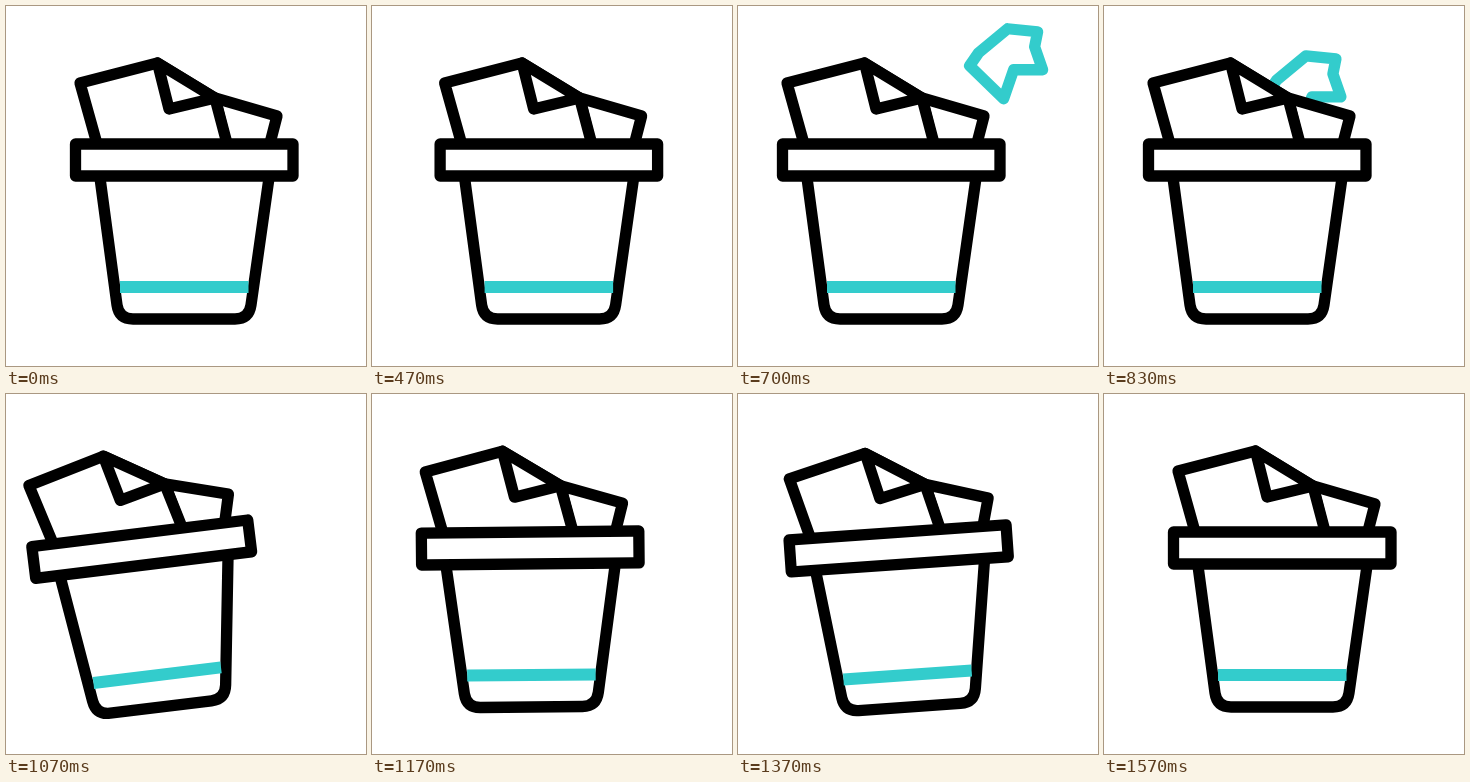
Write an HTML page that moves like this. It is 360 px wide and 360 px high and loops after 2.5 s.

```html
<!DOCTYPE html>
<html lang="en">
<head>
<meta charset="utf-8">
<title>Paper bin</title>
<style>
  html, body { margin: 0; height: 100%; overflow: hidden; background: #fff; }
  svg { display: block; width: 100%; height: 100%; }
  path { stroke-width: 11.3; stroke-linejoin: round; stroke-linecap: round; }
  .ink { stroke: #000; fill: #fff; }
  .teal { stroke: #33cccc; fill: none; }
</style>
</head>
<body>
<svg viewBox="0 0 360 360">
  <path id="ball" class="teal" d="M306 51L336 54L333 69L341 92L312 92L302 121L268 88L277 75Z"/>
  <g id="bin">
    <path class="ink" d="M209 92L271 110L262 145H222Z"/>
    <path class="ink" d="M93 145L74 77L151.500 57L209 92L223 145"/>
    <path class="ink" d="M151.500 57L163 103L209 92Z"/>
    <path class="ink" d="M94 172L111 299Q113 313 127 313H229Q243 313 245 299L263 172"/>
    <path class="teal" style="stroke-width:12;stroke-linecap:butt" d="M114 281H242.500"/>
    <path class="ink" d="M69.500 138H287V170H69.500Z"/>
  </g>
</svg>
<script>
const FPS = 30, LOOP = 2500;
const ball = document.getElementById('ball');
const bin = document.getElementById('bin');

const clamp = v => Math.min(1, Math.max(0, v));
const linear = (f, a, b) => clamp((f - a) / (b - a));
const ease = (f, a, b) => {
  const u = linear(f, a, b);
  return u * u * (3 - 2 * u);
};

// Sum of eased steps through [frame, value] keys
const track = (f, keys) => keys.slice(1).reduce((v, [at, to], i) =>
  v + (to - keys[i][1]) * ease(f, keys[i][0], at), keys[0][1]);

const SLIDE = [[13, 0], [20, -25], [29, -25], [47, 0]];
const TILT = [[29, 0], [33, -8.3], [37, 7.2], [41, -4], [45, 0]];

function draw(now) {
  // Motion advances in whole steps at 30 per second
  const f = Math.floor((now % LOOP) * FPS / 1000 + 0.15);

  bin.setAttribute('transform',
    `translate(${track(f, SLIDE)} 0) rotate(${track(f, TILT)} 178 313)`);

  // The ball rises in an arc, then drops behind the bin
  const e = ease(f, 17, 28);
  const x = 3 - 131 * e;
  const y = 2 + e * (e - 0.83) * (121 + 230 * e);
  ball.setAttribute('transform', `translate(${x} ${y})`);
  ball.setAttribute('opacity', f < 28 ? linear(f, 16, 19) : 0);

  requestAnimationFrame(draw);
}
draw(performance.now());
</script>
</body>
</html>
```
